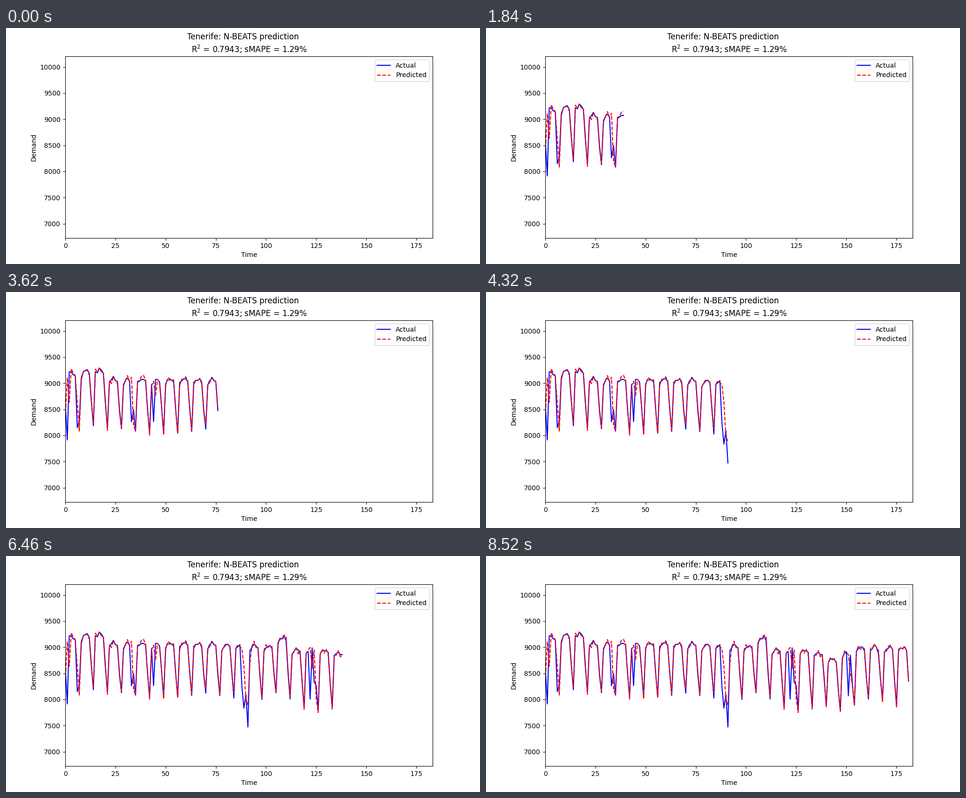
Recreate the animation shown at these times as a matplotlib script. Size 1000 px wide and 500 px high, loop 8.62 s.

```python
import matplotlib.pyplot as plt
import numpy as np
from matplotlib.animation import FuncAnimation

TICK = 20        # ms
LOOP = 8620      # ms
DAYS = 182
LOWEST, HIGHEST = 7473, 9277

# Key points (week, demand) of the workday level and the Sunday low
LEVEL = [(0, 9180), (2, 9240), (3, 9070), (11, 9040), (14, 8990), (15, 9160),
         (16, 8930), (19, 8900), (20, 8750), (22, 8980), (25, 8970)]
LOW = [(0, 8330), (2, 8220), (5, 8060), (11, 8080), (14, 7990), (15, 8110),
       (18, 7770), (20, 7900), (21, 7780), (23, 8010), (25, 7890)]

# Days when demand fell out of its weekly rhythm
HOLIDAYS = {0: 8650, 1: 7915, 6: 8150, 33: 8265, 44: 8265, 88: 8250,
            89: 7835, 90: 8090, 91: LOWEST, 122: 8005, 124: 8330, 151: 8070}

SATURDAY = 0.43    # share of the climb from the Sunday low to the level
REACTION = 0.4     # share of yesterday's drop that the forecast repeats


def curve(points, x):
    return np.interp(x, *zip(*points))


def weekly_rhythm(days):
    week, weekday = days // 7, days % 7
    level = curve(LEVEL, week)
    low, next_low = curve(LOW, week), curve(LOW, week + 1)
    arc = level + 30 - 20 * (weekday - 3.2) ** 2
    saturday = next_low + SATURDAY * (level - next_low)
    return np.select([weekday == 0, weekday == 6], [low, saturday], arc)


def make_series(days):
    rng = np.random.default_rng(4)
    usual = weekly_rhythm(days) + rng.normal(0, 22, DAYS)
    actual = usual.copy()
    actual[list(HOLIDAYS)] = list(HOLIDAYS.values())
    drop = np.minimum(actual - usual, 0)
    late = REACTION * np.append(0, drop[:-1])
    forecast = usual + late + rng.normal(0, 35, DAYS)
    return actual, forecast


def last_day(frame):
    """Days appear in threes: two short steps, then a long pause."""
    if frame < 6:
        return 0
    group, step = divmod(frame - 6, 7)
    return min(1 + 3 * group + min(step, 2), DAYS - 1)


days = np.arange(DAYS)
actual, forecast = make_series(days)

fig, ax = plt.subplots(figsize=(10, 5), dpi=100)
fig.suptitle("Tenerife: N-BEATS prediction")
ax.set_title("R$^2$ = 0.7943; sMAPE = 1.29%")
ax.set_xlabel("Time")
ax.set_ylabel("Demand")
ax.set_xlim(0, DAYS + 1)
ax.set_ylim(LOWEST * 0.9, HIGHEST * 1.1)
actual_line, = ax.plot([], [], color="blue", label="Actual")
forecast_line, = ax.plot([], [], color="red", ls="--", label="Predicted")
ax.legend(loc="upper right")


def update(frame):
    n = last_day(frame) + 1
    actual_line.set_data(days[:n], actual[:n])
    forecast_line.set_data(days[:n], forecast[:n])
    return actual_line, forecast_line


anim = FuncAnimation(fig, update, frames=LOOP // TICK, interval=TICK,
                     repeat=True, repeat_delay=0)
plt.show()
```
